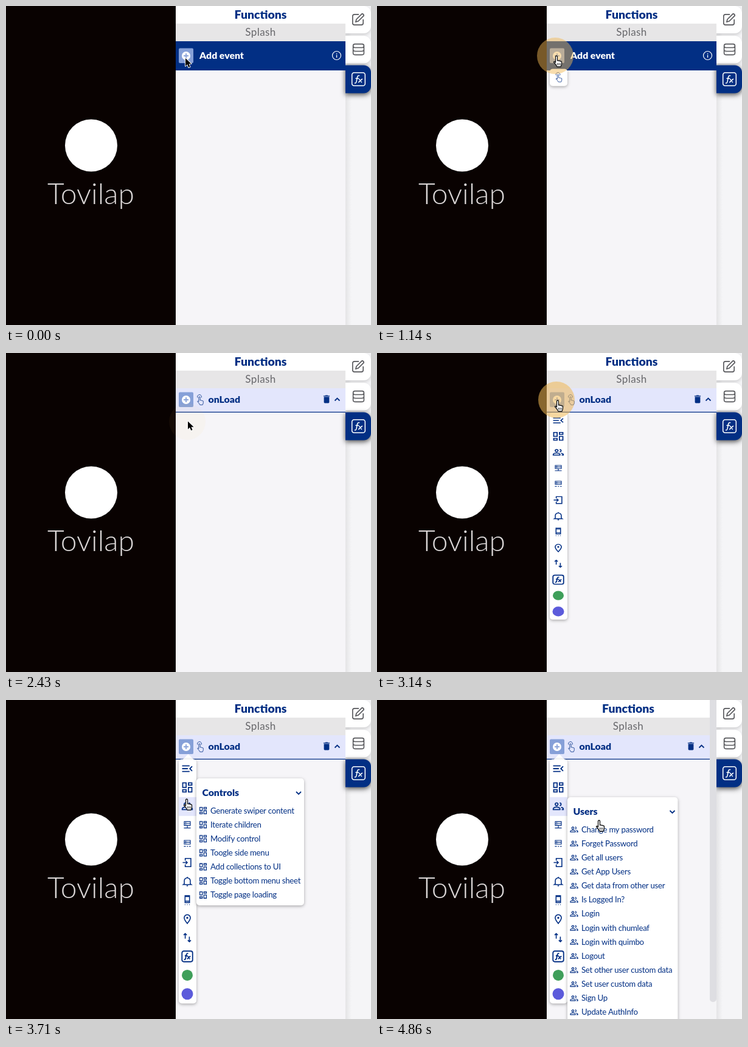
These frames come from a looping animation (600x525 px, 5.01 s). An HTML page with a canvas:

```html
<!DOCTYPE html>
<html lang="en">
<head>
<meta charset="utf-8">
<title>Functions panel</title>
<style>
html, body { margin: 0; width: 100%; height: 100%; overflow: hidden; background: #f6f5f8; }
canvas { display: block; width: 600px; height: 525px; }
</style>
</head>
<body>
<canvas id="stage"></canvas>
<script>
const W = 600, H = 525, LOOP = 5010, FPS = 7;
const NAVY = '#022f84', PALE = '#e3e6fc', GREY = '#55565a', BUTTON = '#86a0d8';
const CLICKS = [
  { at: 970, x: 293, y: 82 },
  { at: 2060, x: 298, y: 113 },
  { at: 3003, x: 295, y: 77 }
];
const ADDED = 2250, CONTROLS = 3500, HOVER_USERS = 3650, USERS = 3800;

// time, x, y of the pointer tip
const PATH = [
  [0, 295, 86], [600, 295, 82], [1430, 295, 82], [1800, 298, 111], [2290, 299, 112.5],
  [2500, 299, 112.5], [2860, 297, 78], [3200, 297, 78], [3430, 297, 112],
  [3715, 297, 163], [4000, 297, 172], [4715, 360, 196], [4860, 365, 198], [LOOP, 365, 198]
];

const ICONS = {
  edit: 'M13 4H6a3 3 0 0 0-3 3v11a3 3 0 0 0 3 3h11a3 3 0 0 0 3-3v-6M9 12l9-9q3 0 3 3l-9 9-4 1z',
  data: 'M6 3h12a3 3 0 0 1 0 6H6a3 3 0 0 1 0-6zM3 6v6q0 3 4 3h10q4 0 4-3V6M3 12v6q0 3 4 3h10q4 0 4-3v-6M6.5 12h.2M6.5 18h.2',
  fx: 'M6 3h12a3 3 0 0 1 3 3v12a3 3 0 0 1-3 3H6a3 3 0 0 1-3-3V6a3 3 0 0 1 3-3zM13.5 7.3q-2.6-1-3.2 2l-1.2 6q-.5 2.6-2.6 1.8M7.8 11h4.6M12.6 11.5l3.8 5M17.3 11.5l-5.5 5',
  menu: 'M3 7h13M3 12h10M3 17h13M20.5 8l-4 4 4 4',
  grid: 'M4 4h6v8h-6zM14 4h6v4h-6zM14 12h6v8h-6zM4 16h6v4h-6z',
  users: 'M11.5 8.5a2.5 2.5 0 1 1-5 0a2.5 2.5 0 1 1 5 0M3 18v-1.5c0-2 4-3 6-3s6 1 6 3V18zM14.5 6a2.5 2.5 0 0 1 0 5M17 14c2 .5 4 1.3 4 2.5V18h-3',
  server: 'M4 3h16v5H4zM4 8h16v5H4zM7 5.5h2M7 10.5h2M12 13v6M3 20h18',
  serverOff: 'M4 3h16v5H4zM4 8h16v5H4zM7 5.5h2M7 10.5h2M3 19h5M11 19h3M17 19h4',
  enter: 'M8 8V4h11v16H8v-4M3 12h9M9 9l3 3-3 3',
  bell: 'M6 17v-6a6 6 0 0 1 12 0v6l2 1.5H4zM10.5 21h3M12 3v2',
  phone: 'M7.5 3h9v14h-9zM8 5h8M8 14h8M7 21h1M11.5 21h1M16 21h1',
  pin: 'M12 21c-4-5-6-8-6-11a6 6 0 0 1 12 0c0 3-2 6-6 11zM11 10a1 1 0 1 0 2 0a1 1 0 1 0-2 0',
  swap: 'M8 14V4M5 7l3-3 3 3M16 10v10M13 17l3 3 3-3'
};
// menu order with the scale of each icon
const MENU = Object.entries({
  menu: .94, grid: .94, users: .92, server: .62, serverOff: .62, enter: .84,
  bell: .82, phone: .82, pin: .85, swap: .85, fx: .97
});
const paths = Object.fromEntries(Object.entries(ICONS).map(([k, d]) => [k, new Path2D(d)]));
const hand = new Path2D('M-1.5 1.5a1.5 1.5 0 0 1 3 0V8q1.5-1 2.5.5q1.5-.8 2.5.5q2-.5 2 1.5V13q0 2-1.5 5H1q-2-4-5.5-7.5q.5-2.5 3 .5z');
const fingers = new Path2D('M1.4 12v3.5M3.7 12v3.5M6 12v3.5');
const arrow = new Path2D('M0 0V14l3.3-3 2.4 5.4 2.5-1.1L5.9 10h4.5z');
const trash = new Path2D('M6 19c0 1.1.9 2 2 2h8c1.1 0 2-.9 2-2V7H6zM19 4h-3.5l-1-1h-5l-1 1H5v2h14z');

const CONTROL_ITEMS = ['Generate swiper content', 'Iterate children', 'Modify control',
  'Toogle side menu', 'Add collections to UI', 'Toggle bottom menu sheet', 'Toggle page loading'];
const USER_ITEMS = ['Change my password', 'Forget Password', 'Get all users', 'Get App Users',
  'Get data from other user', 'Is Logged In?', 'Login', 'Login with chumleaf', 'Login with quimbo',
  'Logout', 'Set other user custom data', 'Set user custom data', 'Sign Up', 'Update AuthInfo'];

const canvas = document.getElementById('stage');
const c = canvas.getContext('2d');
const dpr = window.devicePixelRatio || 1;
canvas.width = W * dpr;
canvas.height = H * dpr;

function rect(x, y, w, h, fill, radius = 0) {
  c.fillStyle = fill;
  c.beginPath();
  c.roundRect(x, y, w, h, radius);
  c.fill();
}

function disc(x, y, r, fill) {
  c.fillStyle = fill;
  c.beginPath();
  c.arc(x, y, r, 0, Math.PI * 2);
  c.fill();
}

function shadowed(blur, dy, color, draw) {
  c.save();
  c.shadowBlur = blur * dpr;
  c.shadowOffsetY = dy * dpr;
  c.shadowColor = color;
  draw();
  c.restore();
}

function card(x, y, w, h, fill = '#fff') {
  shadowed(5, 1.5, 'rgba(0,0,0,.33)', () => rect(x, y, w, h, fill, 5));
}

function text(str, x, y, size, { weight = 400, color = NAVY, align = 'left', gap = 0 } = {}) {
  c.font = `${weight} ${size}px Lato, "Open Sans", sans-serif`;
  c.letterSpacing = gap + 'px';
  c.textAlign = align;
  c.fillStyle = color;
  c.fillText(str, x, y);
  c.letterSpacing = '0px';
}

function icon(name, x, y, scale, color = NAVY, width = 1.9) {
  c.save();
  c.translate(x, y);
  c.scale(scale, scale);
  c.translate(-12, -12);
  c.strokeStyle = color;
  c.lineWidth = width;
  c.stroke(paths[name]);
  c.restore();
}

function line(points, color, width) {
  c.strokeStyle = color;
  c.lineWidth = width;
  c.beginPath();
  points.forEach(([x, y]) => c.lineTo(x, y));
  c.stroke();
}

function chevron(x, y, dir) {
  line([[x - 4, y - 2 * dir], [x, y + 2 * dir], [x + 4, y - 2 * dir]], NAVY, 1.8);
}

function touch(x, y) {
  c.save();
  c.translate(x - 1, y - 5);
  c.scale(.74, .74);
  c.strokeStyle = NAVY;
  c.lineWidth = 1.1;
  c.stroke(hand);
  c.beginPath();
  c.arc(0, 0, 4.6, Math.PI * .85, Math.PI * 2.15);
  c.stroke();
  c.restore();
}

function plus(x, y) {
  rect(x - 12, y - 12.5, 24, 24.5, BUTTON, 2);
  disc(x, y, 7, '#fff');
  line([[x - 4, y], [x + 4, y]], BUTTON, 1.8);
  line([[x, y - 4], [x, y + 4]], BUTTON, 1.8);
}

function pointerTip(x, y, h) {
  c.fillStyle = '#fff';
  c.beginPath();
  c.moveTo(x, y);
  c.lineTo(x + h, y + h);
  c.lineTo(x - h, y + h);
  c.fill();
}

function opening(t, at) {
  const p = Math.min(1, Math.max(0, (t - at) / 300));
  return 1 - (1 - p) ** 3;
}

function squash(originY, scale, draw) {
  c.save();
  c.translate(0, originY);
  c.scale(1, scale);
  c.translate(0, -originY);
  draw();
  c.restore();
}

function drawSplash() {
  rect(0, 0, 279, H, '#090201');
  disc(140, 229.5, 43, '#fff');
  text('Tovilap', 139.5, 326, 48, { weight: 300, color: '#dcd8d8', align: 'center' });
}

function drawTabs() {
  rect(558, 0, 42, H, '#f5f5f7');
  const g = c.createLinearGradient(558, 0, 568, 0);
  g.addColorStop(0, 'rgba(0,0,0,.07)');
  g.addColorStop(1, 'rgba(0,0,0,0)');
  rect(558, 0, 10, H, g);
  const tab = (y, h, fill, blur, alpha) => shadowed(blur, 2.5, `rgba(0,0,0,${alpha})`,
    () => rect(558, y, 42, h, fill, [0, 12, 12, 0]));
  tab(0, 45, '#fff', 5, .15);
  tab(49, 45.5, '#fff', 5, .15);
  tab(97.5, 46, NAVY, 8, .7);
  icon('edit', 579, 22, 1.02, GREY, 1.6);
  icon('data', 579.5, 71.5, .99, GREY, 1.6);
  icon('fx', 579.5, 120.5, 1.2, '#fff', 1.3);
}

function drawHeader(right) {
  const mid = (279 + right) / 2;
  rect(279, 0, right - 279, 29, '#fff');
  rect(279, 29, right - 279, 29, '#e7e6e7');
  text('Functions', mid, 21, 19.4, { weight: 900, align: 'center' });
  text('Splash', mid, 49, 17, { color: '#67676b', align: 'center', gap: .4 });
}

function drawAddRow() {
  rect(279, 58, 279, 48, NAVY);
  plus(296, 82);
  text('Add event', 318, 87, 15.8, { weight: 900, color: '#fff' });
  c.strokeStyle = '#fff';
  c.lineWidth = 1.2;
  c.beginPath();
  c.arc(543.5, 81.5, 7, 0, Math.PI * 2);
  c.stroke();
  rect(542.9, 80.5, 1.3, 4.5, '#fff');
  rect(542.9, 77.8, 1.3, 1.5, '#fff');
}

function drawEventRow(right) {
  rect(279, 58, right - 279, 39, PALE);
  rect(279, 96.7, right - 279, 1.3, NAVY);
  plus(296, 77);
  touch(319, 77);
  text('onLoad', 332.5, 82, 15.8, { weight: 900 });
  c.save();
  c.translate(right - 31, 76);
  c.scale(.73, .73);
  c.translate(-12, -12);
  c.fillStyle = NAVY;
  c.fill(trash);
  c.restore();
  chevron(right - 13.5, 76.5, -1);
}

function drawEventPicker(t) {
  const s = opening(t, CLICKS[0].at);
  if (s <= 0) return;
  const hover = t >= 1800;
  if (s === 1) pointerTip(300, 94, 9);
  squash(103, s, () => {
    if (hover) card(313, 103.5, 66, 30.5, '#e1e3fa');
    card(284, 103.5, 29, 30.5, hover ? '#e1e3fa' : '#fff');
    touch(298.5, 118.5);
  });
  if (hover) text('onLoad', 322, 123.5, 14, { weight: 900 });
}

function drawActionMenu(t) {
  const s = opening(t, CLICKS[2].at);
  if (s <= 0) return;
  if (s === 1) pointerTip(299.5, 89, 9);
  const rowY = i => 113 + 30.9 * i;
  squash(100, s, () => {
    card(284, 97.5, 29, 402);
    const row = t >= HOVER_USERS ? 2 : t >= CONTROLS ? 1 : t >= 3400 ? 0 : -1;
    if (row >= 0) rect(284, rowY(row) - 15, 29, 31, PALE);
    MENU.forEach(([name, scale], i) => icon(name, 298, rowY(i), scale));
    disc(298, rowY(11), 9, '#3f9f5a');
    disc(298, rowY(12), 9.5, '#5c5bdb');
  });
}

function drawList(title, name, items, top, width) {
  card(313, top, width, 47 + 23.15 * items.length);
  text(title, 322.5, top + 29, 15.8, { weight: 900 });
  chevron(313 + width - 9, top + 24, 1);
  items.forEach((item, i) => {
    const y = top + 53 + 23.15 * i;
    icon(name, 324, y, .67);
    text(item, 336, y + 4.5, 13.2, { gap: -.25 });
  });
}

function drawRipples(t) {
  for (const { at, x, y } of CLICKS) {
    const age = t - at;
    if (age < 0 || age > 450) continue;
    const alpha = Math.min(.55, 1.2 * (1 - age / 450) ** 1.9);
    disc(x, y, 30 * Math.min(1, age / 100), `rgba(240,185,85,${alpha})`);
  }
}

function cursorAt(t) {
  const i = PATH.findIndex((p, n) => n && t <= p[0]);
  const [t0, x0, y0] = PATH[i - 1], [t1, x1, y1] = PATH[i];
  const p = (t - t0) / (t1 - t0), e = p * p * (3 - 2 * p);
  return [x0 + (x1 - x0) * e, y0 + (y1 - y0) * e];
}

function drawCursor(t) {
  const isArrow = t < 250 || (t >= ADDED && t < 2750);
  c.save();
  c.translate(...cursorAt(t));
  c.lineJoin = 'round';
  if (isArrow) {
    c.scale(.92, .92);
    c.strokeStyle = '#fff';
    c.lineWidth = 2;
    c.stroke(arrow);
    c.fillStyle = '#000';
    c.fill(arrow);
  } else {
    c.fillStyle = '#fff';
    c.fill(hand);
    c.strokeStyle = '#111';
    c.lineWidth = 1.3;
    c.stroke(hand);
    c.lineWidth = .9;
    c.stroke(fingers);
  }
  c.restore();
}

function draw(t) {
  const right = t >= USERS ? 547 : 558;
  c.setTransform(dpr, 0, 0, dpr, 0, 0);
  rect(0, 0, W, H, '#f6f5f8');
  drawSplash();
  drawTabs();
  drawHeader(right);
  if (t < ADDED) {
    drawAddRow();
    drawEventPicker(t);
  } else {
    drawEventRow(right);
    drawActionMenu(t);
    if (t >= USERS) {
      drawList('Users', 'users', USER_ITEMS, 160, 181.5);
      rect(547, 0, 11, H, '#f4f4f6');
      rect(547, -6, 11, 503, '#dedee2', 5);
    } else if (t >= CONTROLS) {
      drawList('Controls', 'grid', CONTROL_ITEMS, 129, 177);
    }
  }
  drawRipples(t);
  drawCursor(t);
}

// motion advances in seven steps a second
const start = performance.now();
function tick() {
  const t = (performance.now() - start) % LOOP;
  const step = Math.min(34, Math.floor((t + 5) * FPS / 1000));
  draw(step * 1000 / FPS);
  requestAnimationFrame(tick);
}
tick();
</script>
</body>
</html>
```
